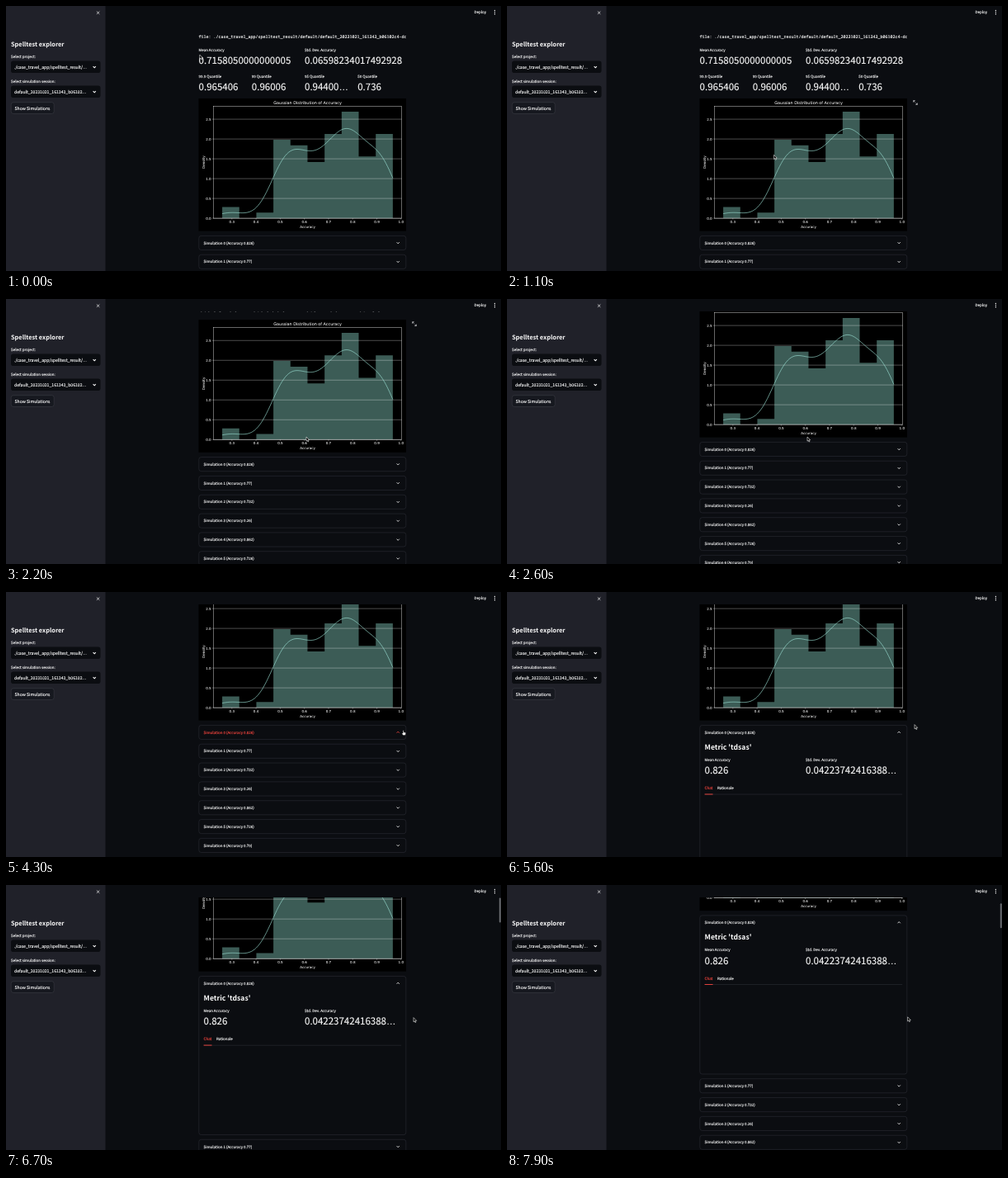
Recreate the animation shown at these times as an HTML page. Size 600 by 321 pixels, loop 8 s.

```html
<!DOCTYPE html>
<html lang="en">
<head>
<meta charset="utf-8">
<title>Spelltest explorer</title>
<style>
  html, body { margin: 0; width: 100%; height: 100%; overflow: hidden; background: #0b0d11; }
  svg { display: block; width: 100vw; height: 100vh; }
  text {
    font-family: "Noto Sans CJK JP", "Noto Sans CJK SC", "Noto Sans CJK", Lato, sans-serif;
    color: #fafafa; fill: currentColor; stroke: currentColor; stroke-width: 0.14;
    white-space: pre; text-rendering: geometricPrecision;
  }
  .plot { font-family: "DejaVu Sans", sans-serif; stroke-width: 0.04; }
  .mono { font-family: "Noto Sans Mono", "DejaVu Sans Mono", monospace; }
  .dots { font-family: "Liberation Sans", Arial, sans-serif; }
  .bold { font-weight: 700; stroke: none; }
  .mid { text-anchor: middle; }
  .end { text-anchor: end; }
</style>
</head>
<body>
<svg id="stage" viewBox="0 0 600 321" preserveAspectRatio="none" xmlns="http://www.w3.org/2000/svg"></svg>
<script>
const NS = 'http://www.w3.org/2000/svg';
const LOOP = 8000, STEP = 100;
const BG = '#0b0d11', BORDER = '#2b2d34', WHITE = '#fafafa', RED = '#f5463f';
const LABEL = 4.48, BODY = 5.11, METRIC = 11.5;
const stage = document.getElementById('stage');

function el(parent, tag, attrs = {}) {
  const node = document.createElementNS(NS, tag);
  for (const key in attrs) node.setAttribute(key, attrs[key]);
  parent.appendChild(node);
  return node;
}

const group = (parent, attrs) => el(parent, 'g', attrs);

const rect = (parent, x, y, width, height, fill, more = {}) =>
  el(parent, 'rect', { x, y, width, height, fill, ...more });

const line = (parent, d, stroke, width, more = {}) =>
  el(parent, 'path', { d, stroke, 'stroke-width': width, fill: 'none', ...more });

function text(parent, str, x, y, size, cls = '', more = {}) {
  const node = el(parent, 'text', { x, y, 'font-size': size, class: cls, ...more });
  const cut = str.endsWith('…');
  node.textContent = cut ? str.slice(0, -1) : str;
  if (cut) el(node, 'tspan', { class: 'dots' }).textContent = '…';
  return node;
}

function clip(id, x, y, width, height) {
  const node = el(stage, 'clipPath', { id });
  return rect(node, x, y, width, height, '#000');
}

function chevron(parent, x, y, width = 0.8) {
  const holder = group(parent, { transform: `translate(${x} ${y})` });
  return line(holder, 'M-1.6 -0.8L0 0.9L1.6 -0.8', WHITE, width);
}

function metric(parent, x, y, label, value) {
  text(parent, label, x, y, LABEL);
  text(parent, value, x, y + 15.4, METRIC);
}

// Sidebar and header

function select(parent, y, label, value) {
  text(parent, label, 6, y - 3.8, LABEL);
  rect(parent, 6, y, 108.5, 14.4, BG, { rx: 2.8 });
  text(parent, value, 10, y + 9.1, BODY);
  chevron(parent, 107.2, y + 7.3, 1.1);
}

function drawSidebar() {
  const g = group(stage);
  rect(g, 0, 0, 120.5, 321, '#202129');
  line(g, 'M109.9 6.5l3.4 3.4M113.3 6.5l-3.4 3.4', WHITE, 0.7);
  text(g, 'Spelltest explorer', 6, 48.6, 7.4, 'bold');
  select(g, 66.6, 'Select project:', './case_travel_app/spelltest_result/…');
  select(g, 96.6, 'Select simulation session:', 'default_20231021_161343_b06102…');
  rect(g, 6.2, 116.7, 52, 13.8, '#16181f', { rx: 2.8, stroke: '#40424b', 'stroke-width': 0.5 });
  text(g, 'Show Simulations', 10.5, 125.5, BODY);
}

function drawHeader() {
  text(stage, 'Deploy', 567.5, 9.4, LABEL);
  for (let i = 0; i < 3; i++) el(stage, 'circle', { cx: 592.4, cy: 5.5 + i * 2.1, r: 0.7, fill: WHITE });
}

// Chart: a histogram of 100 scores with its kernel density

const counts = [2, 0, 1, 14, 13, 10, 15, 19, 11, 15];
const LOW = 0.26, BIN = 0.0706, BAND = 0.058;
const px = v => 273.8 + (v - 0.3) * 292.9;
const py = v => 257.1 - v * 48;

function density(v) {
  return counts.reduce((sum, n, i) => {
    const z = (v - LOW - BIN * (i + 0.5)) / BAND;
    return sum + n / 100 * Math.exp(-z * z / 2) / (BAND * Math.sqrt(2 * Math.PI));
  }, 0);
}

function drawChart(parent) {
  const left = 251.6, right = 479.8, top = 121.6, bottom = py(0);
  rect(parent, 233.5, 112, 251.5, 160.6, '#000');

  let bars = `M${px(LOW)} ${bottom}`;
  counts.forEach((n, i) => {
    bars += `V${py(n / (100 * BIN))}H${px(LOW + BIN * (i + 1))}`;
  });
  el(parent, 'path', { d: bars + `V${bottom}Z`, fill: '#3c5c56' });

  for (let v = 0; v <= 2.5; v += 0.5) {
    line(parent, `M${left} ${py(v)}H${right}`, '#fff', 0.4, { opacity: 0.75 });
    line(parent, `M${left} ${py(v)}h-1.4`, '#fff', 0.35);
    text(parent, v.toFixed(1), 248.7, py(v) + 1.5, 4.08, 'plot end');
  }

  const curve = Array.from({ length: 101 }, (_, i) => {
    const v = LOW + BIN * i / 10;
    return [px(v), py(density(v))];
  });
  line(parent, 'M' + curve.join('L'), '#9addd1', 0.65);
  rect(parent, left, top, right - left, bottom - top, 'none', { stroke: '#fff', 'stroke-width': 0.4 });

  for (let i = 3; i <= 10; i++) {
    const x = px(i / 10);
    line(parent, `M${x} ${bottom}v1.4`, '#fff', 0.35);
    text(parent, (i / 10).toFixed(1), x, 262.9, 4.08, 'plot mid');
  }
  text(parent, 'Gaussian Distribution of Accuracy', 365.6, 119.2, 4.9, 'plot mid');
  text(parent, 'Accuracy', 365.6, 268.7, 4.08, 'plot mid');
  text(parent, 'Density', 0, 0, 4.08, 'plot mid', { transform: 'translate(240.8 189.2) rotate(-90)' });
}

// Page

const ROW = 22.83, BOX = 17.1, FIRST = 278.4, OPEN = 175;
const scores = ['0.826', '0.77', '0.732', '0.26', '0.862', '0.726', '0.79'];

function expander(parent, i) {
  const y = FIRST + i * ROW;
  const box = rect(parent, 233.8, y, 251, BOX, 'none', { rx: 2.8, stroke: BORDER, 'stroke-width': 0.6 });
  const label = text(parent, `Simulation ${i} (Accuracy ${scores[i]})`, 239.6, y + 10.2, LABEL);
  return { box, label, arrow: chevron(parent, 475.2, y + BOX / 2) };
}

function drawDetails(parent) {
  const y = FIRST + BOX / 2;
  text(parent, "Metric 'tdsas'", 239.6, y + 21, 8.6, 'bold');
  metric(parent, 239.6, y + 34.7, 'Mean Accuracy', '0.826');
  metric(parent, 362, y + 34.7, 'Std. Dev. Accuracy', '0.04223742416388…');
  text(parent, 'Chat', 239.6, y + 69.4, LABEL, '', { style: `color:${RED}` });
  text(parent, 'Rationale', 254.9, y + 69.4, LABEL);
  rect(parent, 239.6, y + 74.8, 239.6, 0.6, BORDER);
  rect(parent, 239.6, y + 74.6, 9.9, 0.9, RED);
}

drawSidebar();
drawHeader();
clip('view', 120.5, 15, 479.5, 306);
clip('fileLine', 230, 30, 254.8, 16);
const detailsClip = clip('details', 234, FIRST, 251, BOX);

const view = group(stage, { 'clip-path': 'url(#view)' });
const page = group(view);
text(group(page, { 'clip-path': 'url(#fileLine)' }),
  'file: ./case_travel_app/spelltest_result/default/default_20231021_161343_b06102c4-dc',
  233.6, 39.2, 5, 'mono');
metric(page, 233.6, 54.8, 'Mean Accuracy', '0.7158050000000005');
metric(page, 362, 54.8, 'Std. Dev. Accuracy', '0.06598234017492928');
[['99.9', '0.965406'], ['99', '0.96006'], ['95', '0.94400…'], ['50', '0.736']].forEach(([q, v], i) =>
  metric(page, 233.6 + i * 64.2, 86.7, q + ' Quantile', v));
drawChart(page);
const zoom = line(page, 'M492.7 116.6v-2h2m-2 0l1.8 1.8M497.3 117.4v2h-2m2 0l-1.8 -1.8', '#d8d9dc', 0.7);
const first = expander(page, 0);
drawDetails(group(page, { 'clip-path': 'url(#details)' }));
const rest = group(page);
for (let i = 1; i < scores.length; i++) expander(rest, i);

const thumb = rect(view, 597.8, 0, 2, 30, '#66686d', { rx: 1 });

const cursor = group(stage);
const arrow = el(cursor, 'path', {
  d: 'M0 0V5.2L1.2 4.1L2 6L2.9 5.6L2.1 3.8H3.7Z',
  fill: '#000', stroke: '#fff', 'stroke-width': 0.55, 'stroke-linejoin': 'round'
});
const hand = el(cursor, 'path', {
  d: 'M-0.5 0.4Q0 -0.4 0.5 0.4V2.2L2.7 2.7Q3.1 3 2.9 4.2L2.4 6H-0.4L-1.9 3.7Q-1.8 2.9 -0.5 3.7Z',
  fill: '#fff', stroke: '#000', 'stroke-width': 0.4
});

// Motion

const unit = (t, from, to) => Math.max(0, Math.min(1, (t - from) / (to - from)));

function ease(t, from, to) {
  const k = unit(t, from, to);
  return k * k * (3 - 2 * k);
}

const scrollAt = t =>
  105 * ease(t, 1700, 2380) + 12 * ease(t, 2600, 3200) + 124.5 * ease(t, 5800, 7850);

const moves = [
  { from: 0, to: 450, x: 267, y: 199 },
  { from: 600, to: 1500, x: 364, y: 167 },
  { from: 2600, to: 3350, x: 470, y: 166 },
  { from: 3850, to: 4300, x: 481.6, y: 167.6 },
  { from: 4300, to: 4750, x: 494, y: 160.6 },
  { from: 7200, to: 7600, x: 485.6, y: 159.8 }
];

function cursorAt(t) {
  let x = 234.8, y = 59;
  for (const m of moves) {
    const k = ease(t, m.from, m.to);
    x += (m.x - x) * k;
    y += (m.y - y) * k;
  }
  return [x, y];
}

function render(t) {
  const scroll = scrollAt(t);
  const [x, y] = cursorAt(t);
  page.setAttribute('transform', `translate(0 ${-scroll})`);
  zoom.setAttribute('opacity', ease(t, 500, 800) - ease(t, 2300, 2700));

  const grow = OPEN * (1 - (1 - unit(t, 5400, 5900)) ** 4);
  first.box.setAttribute('height', BOX + grow);
  detailsClip.setAttribute('height', grow ? BOX + grow : 0);
  rest.setAttribute('transform', `translate(0 ${grow})`);

  const active = t >= 2900 && t < 5500;
  first.label.style.color = active ? RED : WHITE;
  first.arrow.setAttribute('stroke', active ? RED : WHITE);
  first.arrow.setAttribute('transform', t >= 3900 ? 'scale(1 -1)' : '');

  thumb.setAttribute('y', scroll * 0.0917);
  thumb.setAttribute('opacity', t >= 6000 ? 1 : 0);

  const over = active && x < 485;
  cursor.setAttribute('transform', `translate(${x} ${y})`);
  hand.setAttribute('opacity', over ? 1 : 0);
  arrow.setAttribute('opacity', over ? 0 : 1);
}

function tick() {
  const t = performance.now() % LOOP;
  render(Math.floor(t / STEP) * STEP);
  requestAnimationFrame(tick);
}
tick();
</script>
</body>
</html>
```
